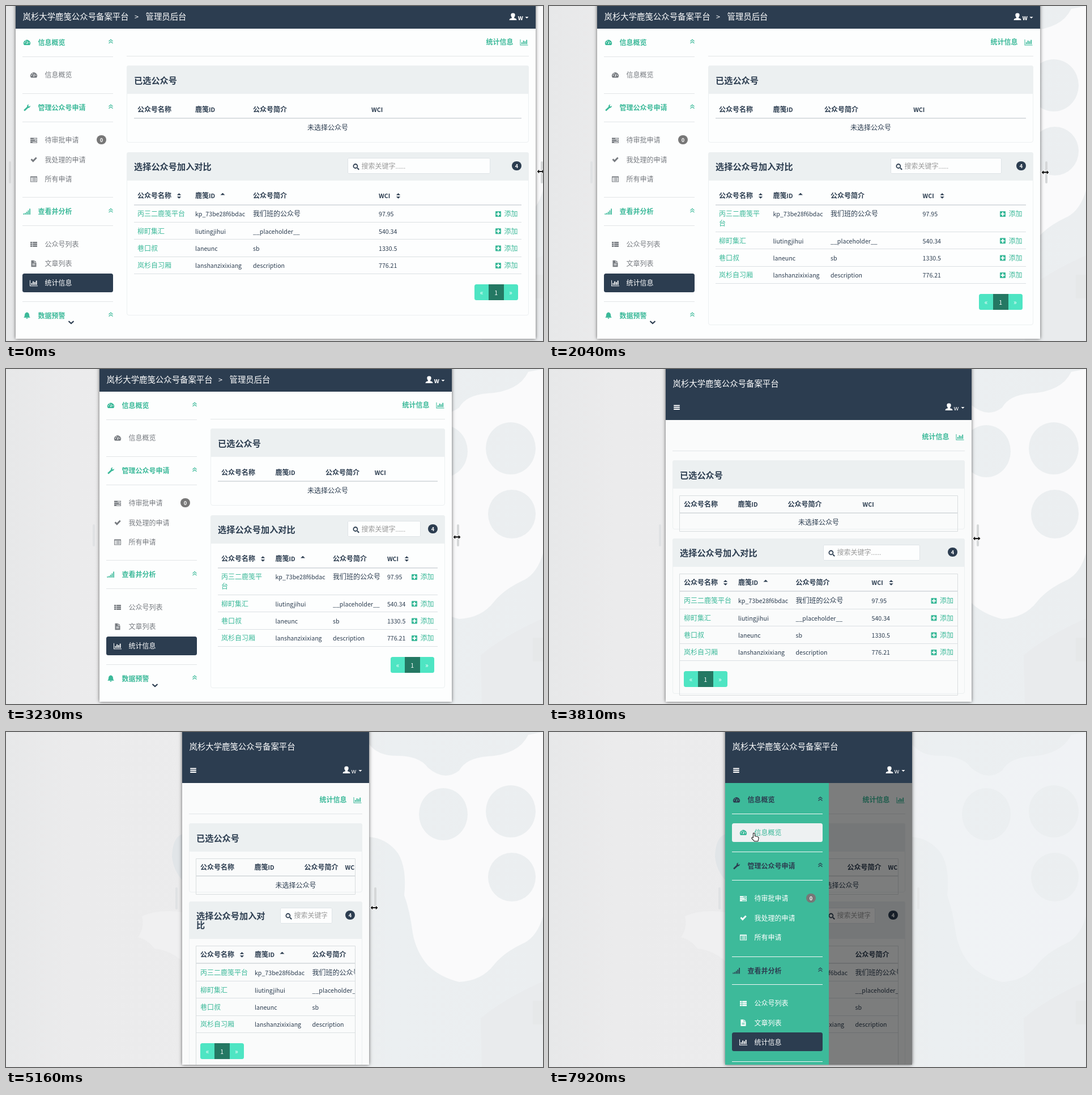
Write an HTML page with a canvas that moves like this. It is 948x591 px and loops after 8000 ms.

```html
<!DOCTYPE html>
<html lang="zh">
<head>
<meta charset="utf-8">
<title>响应式后台</title>
<style>
html, body { margin: 0; width: 100%; height: 100%; overflow: hidden; }
canvas { display: block; }
</style>
</head>
<body>
<canvas id="stage" width="948" height="591"></canvas>
<script>
const g = document.getElementById('stage').getContext('2d');
const FONT = '"Noto Sans CJK SC", "Noto Sans CJK JP", "Noto Sans CJK", sans-serif';
const DARK = '#2c3d50', GREEN = '#3bb999', PALE = '#ecf0f1', RULE = '#e2e5e7';

// bursts of motion: first step, last step, number of steps
const BURSTS = [[510, 1190, 7], [1340, 2040, 7], [2150, 2870, 7], [2990, 3690, 7], [3810, 4600, 8],
  [4720, 5360, 7], [5860, 6470, 11], [6640, 6700, 2], [6880, 7410, 6], [7560, 7920, 6]];

const row3 = s => [-4.5, -1.2, 2.1].map(y => s.replaceAll('Y', y)).join('');
const ICONS = {
  dash: 'M-5 4.5A6 6 0 1 1 5 4.5ZM-.8 2.5L.8-2.6L1.5-2.4L.9 2.5ZM-4.4-.5h1.5v1.5h-1.5zM2.9-.5h1.5v1.5h-1.5zM-2.8-3.2h1.4v1.4h-1.4z',
  wrench: 'M-5.8 4L.2-1.8Q-.4-5.5 3.6-5.7L2-3.6 3.8-2 5.9-3.7Q6 .5 2 .4L-4 6z',
  tasks: row3('M-6 Yh12v2.6h-12z') + 'M0-3.7h5v1h-5zM2-.4h3v1h-3zM-2 2.9h7v1h-7z',
  check: 'M-5.5 0l2-2 2.3 2.3L3.7-4.6l2 2L-1.2 4.6z',
  form: 'M-6-5h12v10h-12zM-5-3h10v7h-10zM-4-2h1.2v1.2h-1.2zM-2-2h6v1.2h-6zM-4 0h1.2v1h-1.2zM-2 0h6v1h-6zM-4 2h1.2v1h-1.2zM-2 2h6v1h-6z',
  signal: 'M-6.5 3h1.7v2h-1.7zM-3.8 2h1.7v3h-1.7zM-1.1 0h1.7v5h-1.7zM1.6-2.5h1.7v7.5h-1.7zM4.3-5.5h1.7v10.5h-1.7z',
  list: row3('M-6 Yh3.4v2.5h-3.4zM-1.8 Yh7.8v2.5h-7.8z'),
  file: 'M-4.5-5.8h5v4h4v7.5h-9zM1.4-5.8l3.1 3.2h-3.1zM-2.5 0h5v.9h-5zM-2.5 2h5v.9h-5z',
  chart: 'M-7-5h1v9.4h13v1h-14zM-4.6 0h1.8v3.3h-1.8zM-1.8-3h1.8v6.3h-1.8zM1-1.8h1.8v5.1h-1.8zM3.8-4.3h1.8v7.6h-1.8z',
  bell: 'M0-6q4 1 4 5q0 3 1.8 4.5h-11.6q1.8-1.5 1.8-4.5q0-4 4-5zM-1.5 4h3q-.3 1.6-1.5 1.6t-1.5-1.6z',
  user: 'M-6.5 6q0-3 4.5-3.8v-1q-1.7-1.5-1.7-4.2 0-3.4 3.7-3.4t3.7 3.4q0 2.7-1.7 4.2v1q4.5.8 4.5 3.8z',
  plus: 'M-5-4q0-1 1-1h8q1 0 1 1v8q0 1-1 1h-8q-1 0-1-1zM-1-3.4h2v2.4h2.4v2h-2.4v2.4h-2v-2.4h-2.4v-2h2.4z',
  search: 'M-5.5-1a4.4 4.4 0 1 1 8.8 0a4.4 4.4 0 1 1-8.8 0zM-3.7-1a2.6 2.6 0 1 0 5.2 0a2.6 2.6 0 1 0-5.2 0zM2 2.4l.9-.9 3 3-1.4 1.4-3-3z',
  sort: 'M-3.7-1.2L0-4.8 3.7-1.2zM-3.7 1.2L0 4.8 3.7 1.2z',
  up: 'M-4 1.5L0-2.2 4 1.5z',
  down: 'M-3-1.5h6L0 1.6z',
  menu: row3('M-5.3 Yh10.6v1.9h-10.6z'),
  resize: 'M-6.5 0l3.7-3.5v2.4h5.6v-2.4l3.7 3.5-3.7 3.5v-2.4h-5.6v2.4z',
  arrow: 'M0 0v13l3-2.8 2 4.6 2-.9-2-4.4h4z',
  hand: 'M0 0q1.3-.7 1.9.6v4.3l5 1.2q2 .6 1.6 2.6l-1 4.6h-5.6L-2.4 8.8q-.7-1.7 1-1.5l1.4 1z',
  fold: 'M-3.5 0L0-3 3.5 0M-3.5 3.5L0 .5 3.5 3.5',
  more: 'M-4.5-2L0 2 4.5-2'
};
for (const k in ICONS) ICONS[k] = new Path2D(ICONS[k]);

const SECTIONS = [
  ['dash', '信息概览', [['dash', '信息概览']]],
  ['wrench', '管理公众号申请', [['tasks', '待审批申请'], ['check', '我处理的申请'], ['form', '所有申请']]],
  ['signal', '查看并分析', [['list', '公众号列表'], ['file', '文章列表'], ['chart', '统计信息']]],
  ['bell', '数据预警', []]
];
const ROWS = [
  ['丙三二鹿笺平台', 'kp_73be28f6bdac', '我们班的公众号', '97.95'],
  ['柳町集汇', 'liutingjihui', '__placeholder__', '540.34'],
  ['巷口叔', 'laneunc', 'sb', '1330.5'],
  ['岚杉自习厢', 'lanshanzixixiang', 'description', '776.21']
];
const HEADS = ['公众号名称', '鹿笺ID', '公众号简介', 'WCI'];
const TITLE = '岚杉大学鹿笺公众号备案平台';

// piecewise linear through x, y pairs
function ramp(x, p) {
  if (x <= p[0]) return p[1];
  for (let i = 2; i < p.length; i += 2)
    if (x <= p[i]) return p[i - 1] + (p[i + 1] - p[i - 1]) * (x - p[i - 2]) / (p[i] - p[i - 2]);
  return p[p.length - 1];
}

function snap(t) {
  let s = 0;
  for (const [a, b, n] of BURSTS)
    for (let k = 0; k < n; k++) {
      const u = a + (b - a) * k / (n - 1);
      if (u <= t + 1) s = u;
    }
  return s;
}

function rect(x, y, w, h, fill) { g.fillStyle = fill; g.fillRect(x, y, w, h); }
function hline(x0, x1, y, color, h = 1) { rect(x0, Math.floor(y), x1 - x0, h, color); }

// rounded box with edges on whole pixels
function box(x, y, w, h, r, fill, stroke) {
  const x0 = Math.floor(x), y0 = Math.floor(y), bw = Math.round(w), bh = Math.round(h);
  if (fill) {
    g.beginPath();
    g.roundRect(x0, y0, bw, bh, r);
    g.fillStyle = fill;
    g.fill();
  }
  if (stroke) {
    g.beginPath();
    g.roundRect(x0 + .5, y0 + .5, bw - 1, bh - 1, r);
    g.strokeStyle = stroke;
    g.lineWidth = 1;
    g.stroke();
  }
}

function clipped(x, y, w, h, draw) {
  g.save();
  g.beginPath();
  g.rect(x, y, w, h);
  g.clip();
  draw();
  g.restore();
}

// Latin runs are set slightly smaller than the Chinese ones
function text(s, x, y, color, weight = 400, size = 12, center = false) {
  const runs = s.match(/[\x00-\x7f]+|[^\x00-\x7f]+/g).map(r => {
    const latin = r.charCodeAt(0) < 128;
    const font = `${latin && weight == 400 ? 300 : weight} ${latin ? size * .885 : size}px ${FONT}`;
    g.font = font;
    return [r, font, g.measureText(r).width];
  });
  if (center) x -= runs.reduce((sum, r) => sum + r[2], 0) / 2;
  g.fillStyle = color;
  for (const [r, font, w] of runs) {
    g.font = font;
    g.fillText(r, x, Math.round(y + size * .37));
    x += w;
  }
}

function icon(name, x, y, color, line) {
  g.save();
  g.translate(x, y);
  if (line) {
    g.strokeStyle = color;
    g.lineWidth = line;
    g.stroke(ICONS[name]);
  } else {
    g.fillStyle = color;
    g.fill(ICONS[name], 'evenodd');
  }
  g.restore();
}

function badge(s, x, y, fill) {
  box(x - 8, y - 8, 17, 16, 8, fill);
  text(s, x + .5, y, '#fff', 700, 10.5, true);
}

function backdrop(fade) {
  const grad = g.createLinearGradient(0, 0, 948, 0);
  [[0, '#e7e8e9'], [.12, '#ebebec'], [.6, '#ececed'], [.72, '#ebeff1'], [1, '#ebeef0']].forEach(s => grad.addColorStop(...s));
  rect(0, 0, 948, 591, grad);
  g.fillStyle = '#f0f0f1';
  g.fill(new Path2D('M233 362Q245 345 240 325Q270 312 312 318V405Q290 385 262 382Q250 366 233 362Z'));
  g.fillStyle = '#e1e5e8';
  g.fill(new Path2D('M312 180Q294 185 293 220Q296 245 312 262Z'));
  g.fillStyle = '#e9ebed';
  g.fill(new Path2D('M838 505Q880 470 948 440V591H840Z'));
  rect(930, 474, 18, 42, '#e6e8e9');
  const white = new Path2D('M640 20Q655 42 690 42Q730 42 745 63Q774 88 800 68Q812 46 850 43Q905 40 922 5L948 0V325Q938 360 915 372Q880 388 862 410Q840 439 800 441Q765 432 745 412Q724 388 718 355Q713 315 703 288Q708 240 692 214Q672 187 640 185Z');
  for (const [x, y, rx, ry] of [[891, 140, 44, 46], [772, 145, 43, 46], [893, 256, 42, 43]]) {
    white.moveTo(x + rx, y);
    white.ellipse(x, y, rx, ry, 0, 0, 7);
  }
  g.globalAlpha = fade;
  g.fillStyle = '#fafafb';
  g.fill(white, 'evenodd');
  g.globalAlpha = 1;
}

function menu(L, panel, hover) {
  const head = panel ? DARK : GREEN, rule = panel ? '#f4f8f7' : RULE, item = panel ? '#fff' : '#777b80';
  const line = y => hline(L + 12, L + 172, y, rule);
  let y = panel ? 120 : 64.5;
  SECTIONS.forEach(([pic, title, items], s) => {
    icon(pic, L + 20, y, head);
    text(title, L + 39.5, y, head, 700);
    icon('fold', L + 168, y - 2.3, head, 1.2);
    if (!items.length) return;
    line(y + 24.5);
    y += 57.5;
    items.forEach(([pic, name], i) => {
      const active = s == 2 && i == 2, over = hover && s == 0;
      if (active || over) box(L + 12, y - 16.5, 160, 33, 3.5, active ? DARK : '#eef1f2');
      const color = active ? '#fff' : over ? GREEN : item;
      icon(pic, L + 32, y, color);
      text(name, L + 51.5, y, color, panel ? 500 : 400);
      if (s == 1 && i == 0) badge('0', L + 151, y - .5, '#777');
      if (i < items.length - 1) y += 34.2;
    });
    y += panel ? 34 : 32.5;
    line(y);
    y += 25;
  });
  if (!panel) icon('more', L + 98, 558, DARK, 2.2);
}

function topBar(L, R, small, lit) {
  rect(L, 0, R - L, small ? 90 : 40, DARK);
  const y = small ? 67 : 19;
  if (small) {
    text(TITLE, L + 12.5, 25.5, '#fff', 400, 14.4);
    icon('menu', L + 19.5, 68, lit ? GREEN : '#fff');
  } else {
    text(TITLE, L + 12.5, y, '#fff', 500, 14.4);
    text('>', L + 210, y, '#fff', 500, 14.4);
    text('管理员后台', L + 229.5, y, '#fff', 500, 14.4);
  }
  icon('user', R - 40, y, '#fff');
  text('w', R - 31.5, y + 1, '#fff', small ? 400 : 700, 12.5);
  icon('down', R - 15.5, y + 1.5, '#fff');
}

function card(x, y, w, h, head) {
  box(x, y, w, h, 3.5, null, PALE);
  box(x, y, w, head, [3.5, 3.5, 0, 0], PALE);
}

function pager(x, y) {
  box(x, y, 77, 28, 3.5, '#4ee5c3');
  box(x + 25, y, 27, 28, 0, '#247863');
  ['«', '1', '»'].forEach((s, i) => text(s, x + 12.5 + i * 25.7, y + 14.5, '#fff', 400, 12, true));
}

function content(L, R, small) {
  const w = R - L, left = small ? L + 12 : L + 196, width = R - 12 - left;
  const tx = left + 13, tr = R - 25, x0 = small ? L + 32 : L + 215;
  const off = small ? 56 : 0, wrap = !small && w < 862 ? 17 : 0;
  const cols1 = small ? [0, 95.5, 183.5, ramp(w, [401, 255.5, 541, 316, 614, 349])]
    : [0, ramp(w, [845, 95.5, 918, 102]), ramp(w, [696, 184, 845, 187.5, 918, 204]), ramp(w, [614, 267, 696, 304.5, 845, 371.5, 918, 413])];
  const cols2 = small ? [0, 96, 197.5, ramp(w, [460, 294, 541, 332, 614, 366])]
    : [0, ramp(w, [845, 95.5, 918, 102]), ramp(w, [845, 197, 918, 204]), ramp(w, [614, 290, 696, 319.5, 845, 389, 918, 426])];

  text('统计信息', R - 87.5, 64 + off, GREEN, 700);
  icon('chart', R - 20.5, 64 + off, GREEN);
  hline(left, R - 12, 88.5 + off, RULE);

  // selected accounts
  card(left, 105.5 + off, width, small ? 122 : 136, 50);
  text('已选公众号', tx, 131 + off, DARK, 700, 15.2);
  const y1 = small ? 239 : 182.5;
  clipped(tx, y1 - 20, tr - tx, 70, () => {
    HEADS.forEach((s, i) => text(s, x0 + cols1[i], y1, DARK, 700));
    text('未选择公众号', tx + Math.max(351, tr - tx) / 2, y1 + 32, DARK, 400, 12, true);
  });
  hline(tx, tr, y1 + 14.5, '#dbdfe2', 2);
  if (small) box(tx - 1, 223, tr - tx + 2, 64, 0, null, '#d9dddf');

  // all accounts
  const cy = small ? 299.5 : 258, two = small && L > 303, head = two ? 65.5 : 49.5;
  const base = cy + head, half = small ? .5 : 0, row = base + 59.5 + half;
  card(left, cy, width, small ? head + 224 : head + 238.5 + wrap, head);
  text(two ? '选择公众号加入对' : '选择公众号加入对比', tx, cy + 25.3, DARK, 700, 15.2);
  if (two) text('比', tx, cy + 41, DARK, 700, 15.2);
  const sx = small ? 484 : 603, sr = small ? R - 65 - (w - 330) * .126 : R - 80 + (918 - w) * .085;
  box(sx, cy + 10.5, sr - sx, 28, 1.5, '#fdfefe', '#dfe4e7');
  icon('search', sx + 15, cy + 25.5, DARK);
  clipped(sx, cy, sr - sx - 9, 50, () => text('搜索关键字......', sx + 24.5, cy + 24.5, '#999'));
  badge('4', R - 34, cy + 24, DARK);

  clipped(tx, base, tr - tx, 260, () => {
    const hy = base + 27.5 + half, end = small ? Math.max(R - 32, x0 + 396) : R - 31.5;
    HEADS.forEach((s, i) => text(s, x0 + cols2[i], hy, DARK, 700));
    icon('sort', x0 + 73.5, hy, DARK);
    icon('up', x0 + cols2[1] + 48.5, hy - 3, DARK);
    icon('sort', x0 + cols2[3] + 34.5, hy, DARK);
    hline(tx, tr, base + 42.5, '#dbdfe2', 2);
    ROWS.forEach((cells, i) => {
      const y = row + i * 30.3 + (i ? wrap : 0);
      cells.forEach((s, c) => {
        const broken = wrap && !i && !c;
        text(broken ? s.slice(0, 6) : s, x0 + cols2[c], y, c ? DARK : GREEN);
        if (broken) text(s.slice(6), x0, y + 16.7, GREEN);
      });
      icon('plus', end - 34.5, y, GREEN);
      text('添加', end - 24, y, GREEN);
      hline(tx, tr, row + i * 30.3 + wrap + 14.5, '#dbe0e3');
    });
    pager(small ? L + 32 : R - 108, base + 184 + half + wrap);
  });
  if (small) box(tx - 1, base + 12, tr - tx + 2, 215, 0, null, '#d9dddf');
}

function cursor(name, x, y) {
  const dark = name != 'hand';
  g.lineJoin = 'round';
  icon(name, x, y, dark ? '#fff' : '#111', 2);
  icon(name, x, y, dark ? '#111' : '#fff');
  g.lineJoin = 'miter';
}

function draw(now) {
  const t = snap(now);
  const edge = ramp(t, [397, 17, 1190, 49, 1340, 53.4, 2040, 85, 2150, 91, 2750, 128, 2870, 139, 2990, 147,
    3690, 200, 3810, 205.6, 4600, 256, 4720, 264, 5140, 311]);
  const L = Math.round(edge), R = Math.round(951.6 - edge), w = R - L, small = w < 614;
  const dim = ramp(t, [6600, 0, 6700, .12, 6880, .33, 7090, .5]);
  const slide = 1 - (1 - ramp(t, [6880, 0, 7305, 1])) ** 2;
  const moving = t < 5860;
  const move = ramp(t, [5800, 0, 6470, 1]), ease = move * move * (3 - 2 * move);
  let cx = 651 - 319 * ease, cy = 310 - 230 * ease;
  if (t >= 6880) {
    cx = ramp(t, [7000, 332, 7410, 336, 7920, 361]);
    cy = ramp(t, [7000, 80, 7410, 92, 7920, 179]);
  }

  backdrop(ramp(t, [7410, 1, 7920, .35]));
  box(L - 12, 274, 4, 39, 2, L < 30 ? '#d8d9da' : '#e0e2e4');
  box(R + 9, 274, 4, 39, 2, moving ? '#d5d7d8' : '#e6e8e9');

  g.shadowBlur = 6;
  g.shadowColor = 'rgba(0,0,0,.6)';
  rect(L, -12, w, 599, small ? '#fafbfb' : '#fdfefe');
  g.shadowColor = 'transparent';

  clipped(L, 0, w, 587, () => {
    content(L, R, small);
    if (!small) menu(L, false);
    if (dim) rect(L, 90, w, 497, `rgba(0,0,0,${dim})`);
    if (slide) {
      const px = L - Math.round(183 * (1 - slide));
      rect(px, 90, 183, 497, '#3dba9a');
      menu(px, true, cy > 161);
    }
    topBar(L, R, small, t >= 6400 && t < 7300);
  });

  if (moving) cursor('resize', R + 9, ramp(L, [17, 292, 53, 293, 128, 294, 205, 299, 311, 310]));
  else cursor(t >= 6400 ? 'hand' : 'arrow', cx, cy);
}

const start = performance.now();
function tick() {
  draw((performance.now() - start) % 8000);
  requestAnimationFrame(tick);
}
tick();
</script>
</body>
</html>
```
